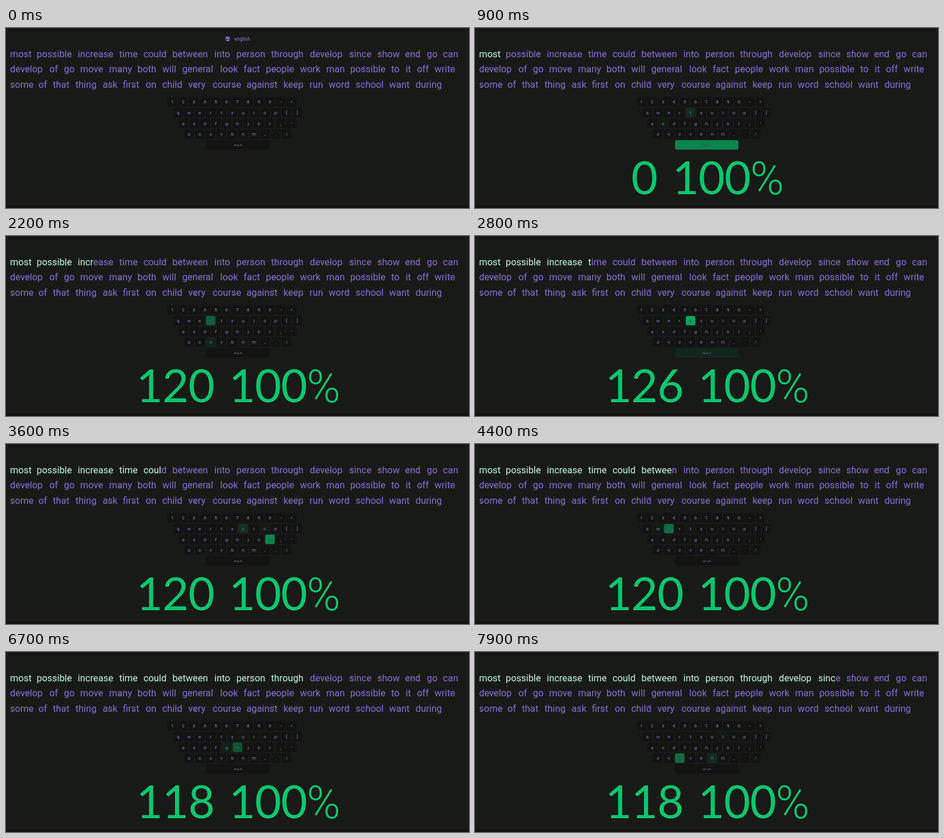
These frames come from a looping animation (800 by 313 pixels, 8000 ms). An HTML page:

```html
<!DOCTYPE html>
<html lang="en">
<head>
<meta charset="utf-8">
<title>Typing test</title>
<style>
  html, body { margin: 0; width: 100%; height: 100%; overflow: hidden; background: #181a17; }
  svg { display: block; width: 100%; height: 100%; font-family: Roboto, sans-serif; fill: #9578d3; }
  .words { font-size: 16.3px; fill: #8c6fcb; }
  .typed { fill: #c2fbe1; }
  .keys { font-size: 8px; text-anchor: middle; }
  .stats { font: 79px Lato, sans-serif; fill: #06c670; text-anchor: middle; letter-spacing: -1px; }
  .percent { font: 300 79px Roboto, sans-serif; text-anchor: start; }
</style>
</head>
<body>
<svg id="stage" viewBox="0 0 800 313"></svg>
<script>
const LOOP = 8000, STEP = 100, START = 440, FADE = 125;
const BG = [24, 26, 23], MAIN = [6, 198, 112], SUB = [149, 120, 211], KEY = [19, 20, 18];

const lines = [
  ['most possible increase time could between into person through develop since show end go can',
    [7, 53, 124, 195.5, 237.5, 287.5, 360, 398, 458, 525, 593, 641.5, 689.5, 727, 755]],
  ['develop of go move many both will general look fact people work man possible to it off write',
    [7, 75, 100, 128, 178, 227, 270, 304.5, 370, 410.5, 449, 508, 553.3, 594.7, 665.5, 690.5, 710, 740.5]],
  ['some of that thing ask first on child very course against keep run word school want during',
    [7, 56, 81, 120, 167, 202, 241.5, 270, 315, 357, 415.5, 479.5, 524.5, 557.5, 604, 662, 707.5]]
];
const script = lines.map(l => l[0]).join(' ');

// Typing rhythm: [characters typed, time in ms]
const rhythm = [[1, START], [10, 1400], [11, 1450], [21, 2430], [23, 2640], [24, 2784], [40, 4350],
  [49, 5325], [61, 6625], [74, 7850], [75, 7944], [76, 8040]];

const presses = [];
for (let i = 1; i < rhythm.length; i++) {
  const [n0, t0] = rhythm[i - 1], [n1, t1] = rhythm[i];
  for (let n = n0; n < n1; n++) presses.push(t0 + (t1 - t0) * (n - n0) / (n1 - n0));
}

const stage = document.getElementById('stage');
function add(parent, tag, attrs = {}, text = '') {
  const el = document.createElementNS('http://www.w3.org/2000/svg', tag);
  for (const name in attrs) el.setAttribute(name, attrs[name]);
  el.textContent = text;
  return parent.appendChild(el);
}
const rgb = c => `rgb(${c})`;
const mix = (a, b, k) => rgb(a.map((v, i) => Math.round(v + (b[i] - v) * k)));
const clamp = (v, lo, hi) => Math.min(hi, Math.max(lo, v));
const countAt = t => presses.filter(p => p <= t).length;

add(stage, 'rect', { width: 800, height: 313, fill: rgb(BG) });
add(stage, 'rect', { y: 308.5, width: 800, height: 4.5, fill: '#141110' });

// Language label with globe
const header = add(stage, 'g');
add(header, 'circle', { cx: 383, cy: 18.8, r: 4.2 });
add(header, 'path', {
  fill: rgb(BG),
  d: 'M379.6 17.2l1.8 1.6 1.5.3-.2 1.4-1.1 1.7-.8-1.8-1.5-1.3zM383 15.2l1.8.2-.6 1.3-1.3.6zM384.4 18.2l2 .2.1 1.4-1 1.5-.9-1.4z'
});
add(header, 'text', { x: 395, y: 21.6, 'font-size': 8.4 }, 'english');

// Words
const words = [];
const wordLayer = add(stage, 'g', { class: 'words' });
let offset = 0;
lines.forEach(([text, xs], row) => text.split(' ').forEach((word, i) => {
  const el = add(wordLayer, 'text', { x: xs[i], y: 50.7 + row * 26.6 });
  words.push({ word, offset, typed: add(el, 'tspan', { class: 'typed' }), rest: add(el, 'tspan') });
  offset += word.length + 1;
}));

// Keyboard
const keys = [];
const keyLayer = add(stage, 'g', { class: 'keys' });
function addKey(char, cx, cy, width, label = char, size = 8) {
  const box = add(keyLayer, 'rect', { x: cx - width / 2, y: cy - 8.2, width, height: 16.4, rx: 3 });
  const text = add(keyLayer, 'text', { x: cx, y: cy + size * 0.34, 'font-size': size }, label);
  keys.push({ char, box, text });
}
[['1234567890-=', 287.4], ['qwertyuiop[]', 297.5], ["asdfghjkl;'", 306.3], ['zxcvbnm,./', 316.3]]
  .forEach(([chars, x], row) => [...chars].forEach((c, i) => addKey(c, x + i * 18.72, 128.4 + row * 18.7, 16.4)));
addKey(' ', 400.4, 203.2, 109.6, 'default', 4.4);

// Speed and accuracy
const stats = add(stage, 'g', { class: 'stats' });
const speed = add(stats, 'text', { x: 292.5, y: 289 });
const accuracy = add(stats, 'g');
add(accuracy, 'text', { x: 452.5, y: 289 }, '100');
add(accuracy, 'text', { x: 519.5, y: 289, class: 'percent' }, '%');

function draw(t) {
  const count = countAt(t);
  const shown = clamp((t - START) / FADE, 0, 1);
  header.setAttribute('opacity', 1 - shown);
  stats.setAttribute('opacity', shown);

  for (const w of words) {
    const n = clamp(count - w.offset, 0, w.word.length);
    w.typed.textContent = w.word.slice(0, n);
    w.rest.textContent = w.word.slice(n);
  }

  for (const k of keys) {
    const last = count ? script.lastIndexOf(k.char, count - 1) : -1;
    const age = last < 0 ? Infinity : t - presses[last];
    const glow = age < 500 ? 2 ** (-age / 50) : 0;
    k.box.setAttribute('fill', mix(KEY, MAIN, glow));
    k.text.setAttribute('fill', mix(SUB, BG, glow));
  }

  // Words per minute, refreshed once a second
  const secs = Math.max(0, Math.floor((t - START) / 1000));
  const wpm = secs ? String(Math.round(countAt(START + secs * 1000) * 12 / secs)) : '0';
  speed.textContent = wpm;
  // The centred pair closes up when the speed has fewer digits
  accuracy.setAttribute('transform', `translate(${(wpm.length - 3) * 22})`);
}

function tick() {
  const t = performance.now() % LOOP;
  draw(Math.floor(t / STEP) * STEP);
  requestAnimationFrame(tick);
}
tick();
</script>
</body>
</html>
```
